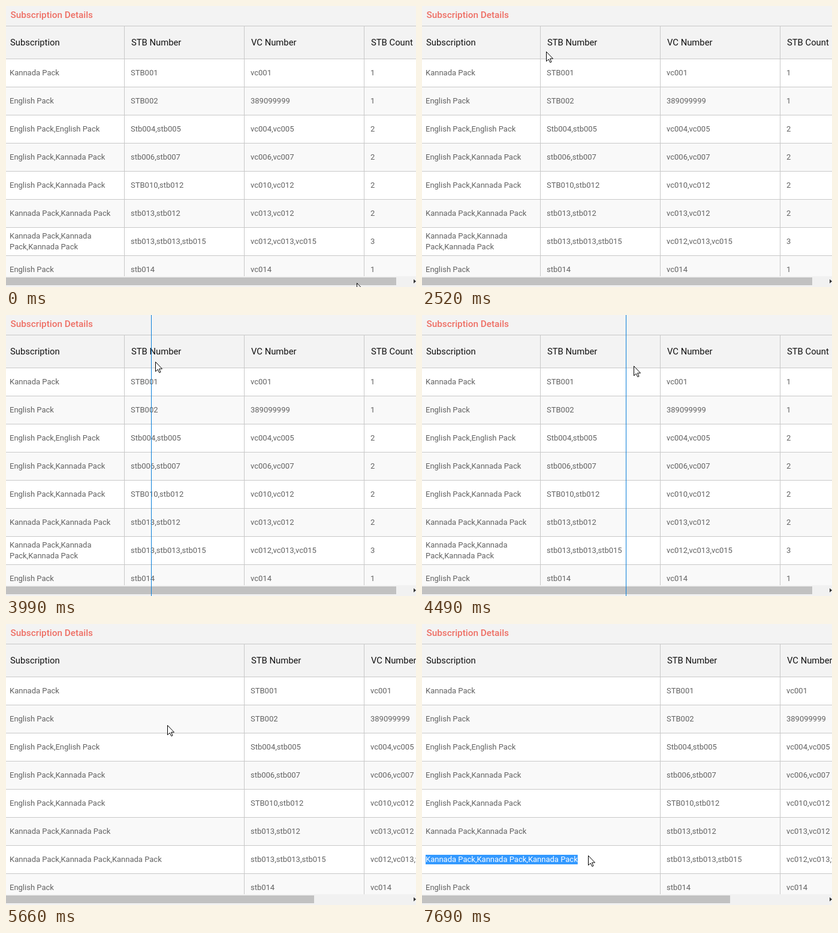
An HTML page for the animation above (8000 ms loop, 684 by 470 pixels).

```html
<!DOCTYPE html>
<html lang="en">
<head>
<meta charset="utf-8">
<title>Subscription Details</title>
<style>
html, body { margin: 0; width: 100%; height: 100%; overflow: hidden; background: #fff; }
svg { display: block; }
text { font: 13px Roboto, "Open Sans", sans-serif; fill: #626262; white-space: pre; }
.head { font-size: 14.8px; fill: #111; }
.title { font-size: 15.3px; font-weight: 500; fill: #ee6e64; }
.picked { fill: #fff; }
</style>
</head>
<body>
<svg width="684" height="470" viewBox="0 0 684 470">
  <defs><clipPath id="clip"><rect id="clipBox" x="6" y="386" height="16"/></clipPath></defs>
  <g id="back"></g>
  <g id="first"></g>
  <g id="rest"></g>
  <g id="narrow"></g>
  <g id="wide"></g>
  <rect id="mark" x="6" y="386" height="16" fill="#3399ff"/>
  <g id="marked" clip-path="url(#clip)"></g>
  <rect y="452" width="684" height="18" fill="#f1f1f1"/>
  <rect id="thumb" y="454" height="13" fill="#c1c1c1"/>
  <path d="M680 457l4 3.5-4 3.5z" fill="#333"/>
  <rect id="guide" width="1" height="470" fill="#0a7fd9"/>
  <path id="arrow" d="M.5.5v16l3.7-3.4 2.6 5.4 2.2-1-2.5-5.4h5z" fill="#fff" stroke="#000"/>
  <g id="resize">
    <path d="M-1.5-8v16M1.5-8v16M-9 .5h7M2 .5h7" stroke="#000"/>
    <path d="M-12 .5l4-4v8zM12 .5l-4-4v8z"/>
  </g>
  <path id="beam" d="M-3-7.5h2.5l.5.5.5-.5H3M0-7V8M-3 8.5h2.5L0 8l.5.5H3" fill="none" stroke="#000"/>
</svg>
<script>
const $ = id => document.getElementById(id);

function add(parent, tag, attrs, content = "") {
  const el = document.createElementNS("http://www.w3.org/2000/svg", tag);
  for (const k in attrs) el.setAttribute(k, attrs[k]);
  el.textContent = content;
  return $(parent).appendChild(el);
}
const rect = (parent, x, y, width, height, fill) => add(parent, "rect", { x, y, width, height, fill });
const label = (parent, x, y, s, cls = "") => add(parent, "text", { x, y, class: cls }, s);

const K = "Kannada Pack", E = "English Pack", triple = [K, K, K].join();
const columns = {
  "Subscription": [K, E, E + "," + E, E + "," + K, E + "," + K, K + "," + K, "", E],
  "STB Number": ["STB001", "STB002", "Stb004,stb005", "stb006,stb007", "STB010,stb012",
    "stb013,stb012", "stb013,stb013,stb015", "stb014"],
  "VC Number": ["vc001", "389099999", "vc004,vc005", "vc006,vc007", "vc010,vc012",
    "vc013,vc012", "vc012,vc013,vc015", "vc014"],
  "STB Count": [..."11222231"]
};
const ROW = 47, LINE = "#c8c8c8";

rect("back", 0, 0, 684, 88, "#f3f3f3");
rect("back", 0, 33, 684, 1, LINE);
label("back", 7.5, 20, "Subscription Details", "title");
for (let i = 0; i < 8; i++) {
  const y = 88 + ROW * i;
  rect("back", 0, y, 684, ROW, i % 2 ? "#f9f9f9" : "#fff");
  rect("back", 0, y, 684, 1, LINE);
}
Object.entries(columns).forEach(([head, cells], c) => {
  const group = c ? "rest" : "first", x = c ? 8 + 200 * c : 6;
  if (c) rect(group, 200 * c - 3, 33, 1, 419, LINE);
  label(group, x + 1, 66, head, "head");
  cells.forEach((s, i) => label(group, x, 116 + ROW * i, s));
});
label("narrow", 6, 389, "Kannada Pack,Kannada");
label("narrow", 6, 407, "Pack,Kannada Pack");
const full = label("wide", 6, 398, triple);
label("marked", 6, 398, triple, "picked");

// Pointer strokes: start, end, then evenly timed points
const STEP = 78;
const strokes = [
  [0, 1, [585, 463], [585, 463]],
  [70, 300, [540, 420], [328, 179]],
  [530, 1146, [322, 175], [160, 85], [69, 51]],
  [1146, 1300, [69, 51], [43, 60]],
  [1370, 2140, [36, 56], [25, 48], [83, 62], [70, 84], [39, 84]],
  [2220, 2520, [50, 86], [207, 76]],
  [2690, 3080, [205, 76], [197, 76]],
  [3630, 3946, [200, 76], [237, 77], [249, 78]],
  [3946, 4420, [249, 78], [341, 84]],
  [4490, 4890, [353, 85], [397, 86]],
  [5580, 5658, [375, 98], [269, 169]],
  [5658, 6360, [269, 169], [110, 315], [19, 388]],
  [6440, 6820, [18, 388], [7, 388]],
  [7050, 7690, [12, 388], [277, 387]]
];

// The pointer is redrawn in steps, and rests between strokes
function pointer(t) {
  const [start, end, ...pts] = strokes.findLast(s => s[0] <= t);
  const steps = Math.max(1, Math.round((end - start) / STEP));
  const u = Math.min(1, Math.floor((t - start) / (end - start) * steps + 0.15) / steps);
  const pos = u * (pts.length - 1), i = Math.min(pts.length - 2, Math.floor(pos));
  return pts[i].map((v, k) => Math.round(v + (pts[i + 1][k] - v) * (pos - i)));
}

const show = (id, on) => $(id).style.display = on ? "" : "none";

function draw(now) {
  const t = now % 8000;
  const [x, y] = pointer(t);
  const widened = t >= 5580, selecting = t >= 7050;

  $("rest").setAttribute("transform", `translate(${widened ? 200 : 0})`);
  $("thumb").setAttribute("width", widened ? 514 : 651);
  show("narrow", !widened);
  show("wide", widened);

  // The guide trails the pointer by one step
  show("guide", t >= 3630 && !widened);
  $("guide").setAttribute("x", pointer(Math.max(0, t - STEP))[0] - 1);

  // Selection grows by whole characters
  const n = triple.length;
  const chars = Math.min(n, Math.round((x - 6) / 252 * n));
  const width = selecting ? full.getComputedTextLength() * chars / n : 0;
  for (const id of ["mark", "clipBox"]) $(id).setAttribute("width", width);

  const kind = t >= 3010 && t < 3630 ? "resize" : selecting && x < 259 ? "beam" : "arrow";
  for (const id of ["arrow", "resize", "beam"]) show(id, id === kind);
  $(kind).setAttribute("transform", `translate(${x} ${y})`);

  requestAnimationFrame(draw);
}
requestAnimationFrame(draw);
</script>
</body>
</html>
```
